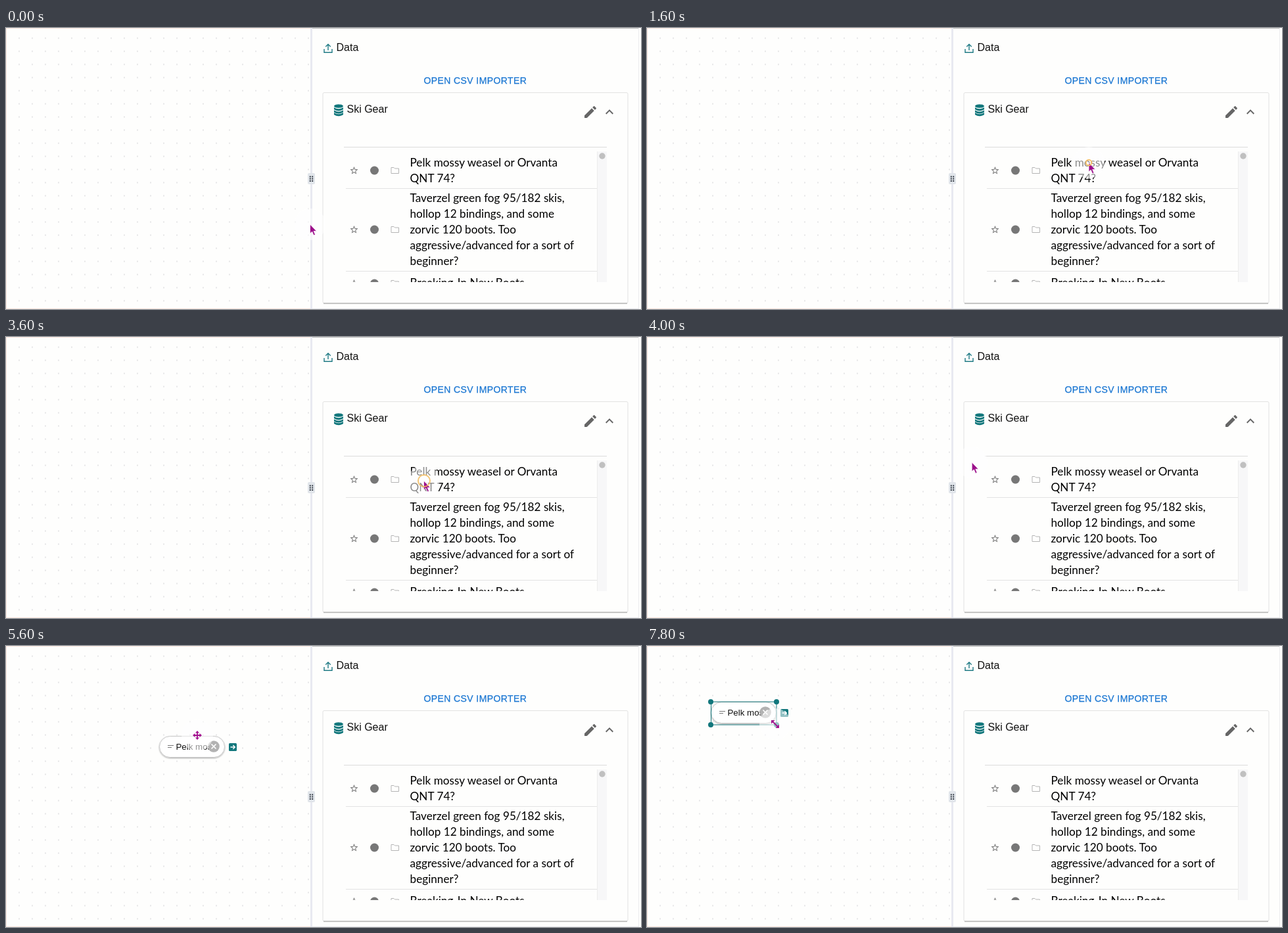
An HTML page that plays this animation: 966 by 428 pixels, repeating every 8000 ms.

```html
<!DOCTYPE html>
<html lang="en">
<head>
<meta charset="utf-8">
<title>Drag a row onto the canvas</title>
<style>
  html, body { margin: 0; width: 100%; height: 100%; overflow: hidden; background: #fefefd; }
  svg { display: block; width: 966px; height: 428px; }
  text { font-family: "Liberation Sans", Arial, sans-serif; font-size: 16px; fill: #111; }
  .rows text { font-family: Lato, sans-serif; font-size: 17.2px; fill: #000; }
  .button { font-size: 14px; letter-spacing: .4px; fill: #1976d2; stroke: #1976d2; stroke-width: .25px; }
  .label { font-size: 13.3px; }
  .teal { fill: #12777c; }
  .divider { stroke: #e3e3e3; fill: none; }
</style>
</head>
<body>
<svg viewBox="0 0 966 428">
  <defs>
    <pattern id="dots" width="20" height="20" patternUnits="userSpaceOnUse" x="10" y="5.5">
      <circle cx="10" cy="10" r=".8" fill="#c9c9ca"/>
    </pattern>
    <filter id="shadow" x="-20%" y="-30%" width="140%" height="180%">
      <feDropShadow dx="0" dy="1" stdDeviation="1" flood-opacity=".35"/>
    </filter>
    <clipPath id="list"><rect x="514" y="182" width="400" height="205"/></clipPath>
    <clipPath id="labelBox"><rect x="24" y="5" width="55" height="24"/></clipPath>
    <g id="rowIcons">
      <path transform="translate(522.3 -7.2) scale(.6)" fill="#777" d="M22 9.24l-7.19-.62L12 2 9.19 8.63 2 9.24l5.46 4.73L5.82 21 12 17.27 18.18 21l-1.63-7.03L22 9.24zM12 15.4l-3.76 2.27 1-4.28-3.32-2.88 4.38-.38L12 6.1l1.71 4.04 4.38.38-3.32 2.88 1 4.28L12 15.4z"/>
      <circle cx="560.5" r="6.5" fill="#777"/>
      <path d="M586 4.5V-4.5H590L591.5-3H597.5V4.5Z" fill="none" stroke="#b5b5b5"/>
    </g>
  </defs>

  <rect width="966" height="428" fill="#fefefd"/>
  <rect width="463" height="428" fill="url(#dots)"/>
  <path d="M463 .5H.5V427.5H463" fill="none" stroke="#fbe7de"/>
  <rect x="463" width="3" height="428" fill="#e8e9f1"/>
  <path d="M466 .5H962" stroke="#bdbdbd"/>
  <path d="M962.5 0V428M466 427.5H962" stroke="#ececef"/>
  <rect x="459" y="221" width="11" height="17" rx="2" fill="#e1e5ea"/>
  <path d="M462.8 225.5V234M466.2 225.5V234" stroke="#333a44" stroke-width="2" stroke-dasharray="2 1.3"/>

  <path d="M484 32V37.3H496V32M490 34V25.5M486.3 28.5L490 24.8L493.7 28.5" fill="none" stroke="#1f7a84" stroke-width="1.4"/>
  <text x="502.5" y="35">Data</text>
  <text class="button" x="635.5" y="84.5">OPEN CSV IMPORTER</text>

  <rect x="482" y="98.5" width="464" height="320.5" rx="2" fill="#fefefd" stroke="#e2e2e2"/>
  <path d="M483 419.5H945" stroke="#b4b4b4" stroke-width="1.3"/>
  <g class="teal">
    <ellipse cx="506" cy="119" rx="7" ry="2.8"/>
    <path id="disk" d="M499 121Q506 125.5 513 121V124Q506 128.5 499 124Z"/>
    <use href="#disk" y="4.3"/>
    <use href="#disk" y="8"/>
  </g>
  <text x="518.5" y="128.5">Ski Gear</text>
  <path transform="translate(877 116)" fill="#666" d="M3 17.25V21h3.75L17.81 9.94l-3.75-3.75L3 17.25zM20.71 7.04c.39-.39.39-1.02 0-1.41l-2.34-2.34c-.39-.39-1.02-.39-1.41 0l-1.83 1.83 3.75 3.75 1.83-1.83z"/>
  <path transform="translate(906 116)" fill="#666" d="M12 8l-6 6 1.41 1.41L12 10.83l4.59 4.58L18 14z"/>

  <path class="divider" d="M514 181.5H914" style="stroke:#dcdcdc"/>
  <g clip-path="url(#list)">
    <path class="divider" d="M517 244.5H899M517 370.5H899"/>
    <rect x="899" y="188" width="15" height="199" fill="#f7f7f8"/>
    <path d="M899.5 188V387" stroke="#ededed"/>
    <circle cx="907" cy="195" r="4.7" fill="#c0c0c0"/>
    <use href="#rowIcons" y="217"/>
    <use href="#rowIcons" y="307"/>
    <use href="#rowIcons" y="389"/>
    <g class="rows" id="rows"></g>
  </g>

  <g id="node">
    <rect x=".5" y=".5" width="99" height="32" rx="16" fill="#fff" stroke="#c9c9c9" filter="url(#shadow)"/>
    <path d="M13 14.5H22M13 17.5H19" stroke="#777" stroke-width="1.2"/>
    <text class="label" x="25.5" y="21" clip-path="url(#labelBox)">Pelk mossy weasel</text>
    <circle cx="83" cy="16" r="8.8" fill="#b2b2b2"/>
    <path d="M79.5 12.5L86.5 19.5M86.5 12.5L79.5 19.5" stroke="#fff" stroke-width="1.7"/>
    <rect class="teal" x="106" y="11" width="12" height="12" rx="1.5"/>
    <path d="M108.5 17H115M112.3 14L115.3 17L112.3 20" fill="none" stroke="#fff" stroke-width="1.4"/>
    <g id="selection" class="teal">
      <rect x=".5" width="99.5" height="35" fill="none" stroke="#12777c"/>
      <circle r="4"/><circle cx="100" r="4"/><circle cy="35" r="4"/><circle cx="100" cy="35" r="4"/>
    </g>
  </g>

  <g id="cursor">
    <circle r="24" fill="#fff" opacity=".55"/>
    <path id="arrow" d="M0 0V14L3.2 11.2L5.6 16.8L8 15.8L5.7 10.4H10Z" fill="#9c0f8b" stroke="#fff" stroke-width=".8"/>
    <g id="move" fill="#a3128f">
      <path d="M-5 0H5M0-5V5" stroke="#a3128f" stroke-width="1.8"/>
      <path d="M0-7L3-3.5H-3ZM0 7L3 3.5H-3ZM-7 0L-3.5-3V3ZM7 0L3.5-3V3Z"/>
    </g>
    <g id="resize" fill="#a3128f">
      <path d="M-4-4L4 4" stroke="#a3128f" stroke-width="1.8"/>
      <path d="M-6-6H-.5L-6-.5ZM6 6H.5L6 .5Z"/>
    </g>
  </g>
  <circle id="ring" fill="none" stroke="#f3bd62" stroke-width="2"/>
</svg>
<script>
const LOOP = 8000, STEP = 200;
const $ = id => document.getElementById(id);

const rowText = [
  [210.5, "Pelk mossy weasel or Orvanta"],
  [234.5, "QNT 74?"],
  [264.5, "Taverzel green fog 95/182 skis,"],
  [288.5, "hollop 12 bindings, and some"],
  [312.5, "zorvic 120 boots. Too"],
  [336.5, "aggressive/advanced for a sort of"],
  [360.5, "beginner?"],
  [393.5, "Breaking-In New Boots"]
];
$("rows").innerHTML = rowText.map(([y, s]) => `<text x="614.5" y="${y}">${s}</text>`).join("");

// Each key: time, x, y
const cursorKeys = [
  [0, 462.5, 299], [1400, 672, 205], [2400, 672, 205], [3400, 635.5, 219],
  [3600, 635.5, 219], [4600, 234, 139], [5000, 234, 139], [5600, 291, 136],
  [6400, 269, 153], [6800, 144, 105], [7200, 133, 101], [7800, 195, 119]
];
const nodeKeys = [[6400, 233, 137], [6800, 122, 100], [7200, 97, 85]];
const clicks = [[1500, 672, 205], [3390, 636, 219], [6400, 269, 153]];

function positionAt(keys, t) {
  const next = keys.findIndex(k => k[0] > t);
  if (next === 0) return keys[0].slice(1);
  if (next < 0) return keys[keys.length - 1].slice(1);
  const [t0, x0, y0] = keys[next - 1], [t1, x1, y1] = keys[next];
  const p = (t - t0) / (t1 - t0), eased = p * p * (3 - 2 * p);
  return [x0 + (x1 - x0) * eased, y0 + (y1 - y0) * eased];
}

const place = (id, [x, y]) => $(id).setAttribute("transform", `translate(${x} ${y})`);
const show = (id, visible) => $(id).style.display = visible ? "" : "none";

function drawRing(t) {
  const click = clicks.find(([start]) => t >= start && t - start < 500);
  show("ring", click);
  if (!click) return;
  const age = t - click[0];
  place("ring", click.slice(1));
  $("ring").setAttribute("r", age * .043);
  $("ring").setAttribute("opacity", 1 - age / 1600);
}

function draw(now) {
  const t = Math.floor(now % LOOP / STEP) * STEP;
  place("cursor", positionAt(cursorKeys, t));
  place("node", positionAt(nodeKeys, t));
  show("node", t >= 5000);
  show("selection", t >= 6400);
  show("arrow", t < 5000);
  show("move", t >= 5000 && t < 7800);
  show("resize", t >= 7800);
  drawRing(t);
}

const start = performance.now();
function tick() {
  draw(performance.now() - start);
  requestAnimationFrame(tick);
}
tick();
</script>
</body>
</html>
```
